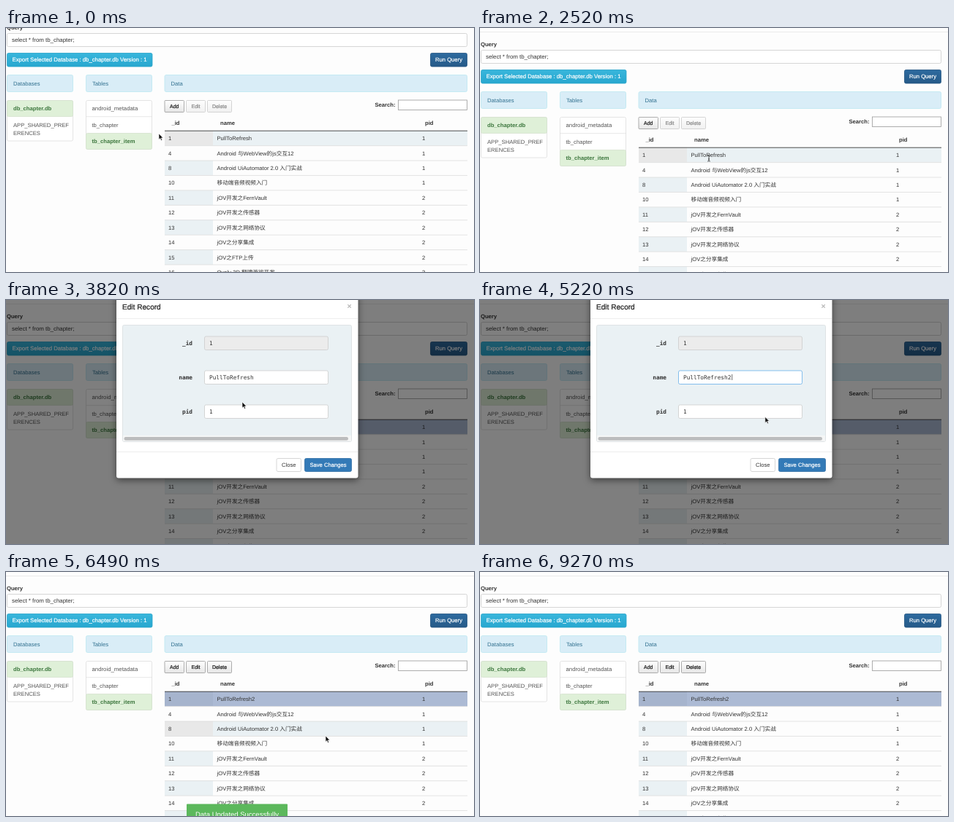
Recreate the animation shown at these times as an HTML page. Size 640 by 335 pixels, loop 9.51 s.

```html
<!DOCTYPE html>
<html lang="zh">
<head>
<meta charset="utf-8">
<title>Database editor</title>
<style>
html, body { margin: 0; width: 100%; height: 100%; overflow: hidden; background: #fdfdfd; }
svg { display: block; width: 640px; height: 335px; }
text { font: 7.65px "Liberation Sans", "Noto Sans CJK SC", sans-serif; fill: #333; white-space: pre; text-rendering: geometricPrecision; }
.b { font-weight: bold; }
.m { stroke: currentColor; stroke-width: .22px; }
.w { fill: #fff; color: #fff; }
.head { fill: #31708f; color: #31708f; }
.ok { fill: #3c763d; }
.item { fill: #555; }
.small { font-size: 7px; }
.mono { font-family: "DejaVu Sans Mono", monospace; font-size: 7.75px; }
.mid { text-anchor: middle; }
.end { text-anchor: end; }
#box { filter: drop-shadow(0 3px 5px rgba(0, 0, 0, .5)); }
</style>
</head>
<body>
<svg id="stage" viewBox="0 0 640 335">
  <defs>
    <linearGradient id="info" x2="0" y2="1"><stop stop-color="#38b6dc"/><stop offset="1" stop-color="#28a7cf"/></linearGradient>
    <linearGradient id="run" x2="0" y2="1"><stop stop-color="#2d6a9f"/><stop offset="1" stop-color="#265a88"/></linearGradient>
    <linearGradient id="grey" x2="0" y2="1"><stop stop-color="#fff"/><stop offset="1" stop-color="#e6e6e6"/></linearGradient>
  </defs>
</svg>
<script>
const LOOP = 9510, ROW_TOP = 164.2, ROW_H = 20.42;
const rows = [
  [1, 'PullToRefresh', 1], [4, 'Android 与WebView的js交互12', 1],
  [8, 'Android UiAutomator 2.0 入门实战', 1], [10, '移动端音频视频入门', 1],
  [11, 'jOV开发之FernVault', 2], [12, 'jOV开发之传感器', 2], [13, 'jOV开发之网络协议', 2],
  [14, 'jOV之分享集成', 2], [15, 'jOV之FTP上传', 2], [16, 'Ovaly 3D 翻牌游戏开发', 3]
];

// y is the vertical middle of the text
const text = (x, y, s, cls = '', attrs = '') =>
  `<text x="${x}" y="${y + 2.75}" class="${cls}" ${attrs}>${s}</text>`;
const rect = (x, y, x2, y2, fill, stroke = 'none', r = 0, attrs = '') => {
  const o = stroke === 'none' ? 0 : .5;
  return `<rect x="${x + o}" y="${y + o}" width="${x2 - x - 2 * o}" height="${y2 - y - 2 * o}" rx="${r}" fill="${fill}" stroke="${stroke}" stroke-width=".8" ${attrs}/>`;
};
const line = (x, y, x2, color, w = .7) =>
  `<path d="M${x} ${y}H${x2}" stroke="${color}" stroke-width="${w}"/>`;
const heading = (x, x2, s) => rect(x, 87, x2, 111, '#d9edf7', '#bce8f1', 2) + text(x + 9, 99, s, 'head');
const tool = (x, x2, s, id) => `<g id="${id}">` + rect(x, 122, x2, 139, 'url(#grey)', '#999', 1) +
  text((x + x2) / 2, 130.7, s, 'small mid m') + '</g>';
const field = (y, label, value, fill, id) => text(255, y, label, 'mono b end') +
  rect(271, y - 9.5, 441, y + 10, fill, '#ccc', 2, `id="${id}Box"`) + text(278, y, value, 'mono', `id="${id}"`);

const tableRow = ([id, name, pid], i) => {
  const y = ROW_TOP + i * ROW_H, mid = y + ROW_H / 2;
  return rect(217, y, 631, y + ROW_H, '#fdfdfd', 'none', 0, `id="row${i}"`) +
    rect(217, y, 283, y + ROW_H, '#fdfdfd', 'none', 0, `id="cell${i}"`) +
    (i ? line(217, y, 631, '#d8d8d8') : '') +
    text(222, mid, id) + text(288.5, mid, name, '', `id="name${i}"`) + text(569, mid, pid);
};

const page = `<g id="page">
  ${line(0, 5.5, 640, '#e4e4e4')}
  ${text(1, 22, 'Query', 'b')}
  ${rect(1, 30, 631, 49, '#fff', '#ccc', 2)}
  ${text(8, 39.3, 'select * from tb_chapter;', '', 'style="font-size:7.9px"')}
  ${rect(1, 57, 200.5, 76.5, 'url(#info)', '#28a4c9', 2)}
  ${text(8.5, 66.5, 'Export Selected Database : db_chapter.db Version : 1', 'w m', 'style="font-size:7.74px"')}
  ${rect(580, 57, 631, 76.5, 'url(#run)', '#245580', 2)}
  ${text(605.5, 66.5, 'Run Query', 'w m mid')}
  ${heading(1, 92, 'Databases')}${heading(109, 200, 'Tables')}${heading(216.5, 631, 'Data')}
  ${rect(1, 122, 92, 178.5, '#fff', '#ddd', 2)}
  ${rect(1, 122, 92, 145, '#dff0d8', '#d5e3cf', 2)}
  ${text(10, 133.3, 'db_chapter.db', 'b ok')}
  ${text(10, 156, 'APP_SHARED_PREF', 'item')}${text(10, 167, 'ERENCES', 'item')}
  ${rect(109, 122, 200, 190, '#fff', '#ddd', 2)}${line(109, 144.7, 200, '#ddd')}
  ${rect(109, 167, 200, 190, '#dff0d8', '#d5e3cf', 2)}
  ${text(117.5, 133.3, 'android_metadata', 'item', 'style="font-size:7.8px"')}
  ${text(117.5, 156, 'tb_chapter', 'item')}${text(117.5, 178.5, 'tb_chapter_item', 'b ok')}
  ${tool(216.5, 244, 'Add', 'add')}${tool(246, 273, 'Edit', 'edit')}${tool(275, 309, 'Delete', 'del')}
  ${text(504.5, 128.7, 'Search:', 'b')}${rect(536, 121.5, 631, 136, '#fff', '#999')}
  ${text(226.5, 153.2, '_id', 'b')}${text(293, 153.2, 'name', 'b')}${text(573, 153.2, 'pid', 'b')}
  ${rows.map(tableRow).join('')}
  ${line(217, ROW_TOP, 631, '#222', .8)}
</g>`;

const modal = `<rect id="shade" width="640" height="335"/>
<g id="modal">
  <rect id="box" x="151" y="-20" width="330.5" height="264.5" rx="3" fill="#fff"/>
  ${text(159, 10.3, 'Edit Record', 'm', 'style="font-size:10.1px"')}
  ${text(469.5, 9, '×', 'mid b', 'style="font-size:10.5px;fill:#b5b5b5"')}
  ${line(151, 25.5, 481, '#e8e8e8')}
  ${rect(159, 34, 473, 195, '#eaf1f4', '#d9dde0', 2)}
  ${rect(160, 186, 472, 194, '#f5f6f6')}${rect(161.5, 188, 468, 192.7, '#bcbdbe', 'none', 2.3)}
  ${field(59, '_id', '1', '#ececec', 'idField')}
  ${field(106, 'name', 'PullToRefresh', '#fff', 'nameField')}
  ${field(153, 'pid', '1', '#fff', 'pidField')}
  <path id="caret" d="M340 102v8" stroke="#333" stroke-width=".7"/>
  <g id="alert">${rect(159, 200.5, 473, 229, '#dff0d8', '#d0e4c6', 2)}
    ${text(168, 214.5, 'Success!', 'b ok')}${text(204, 214.5, 'This record has been updated.', 'ok')}</g>
  <g id="foot">${line(151, 208.5, 481, '#e5e5e5')}
    <g id="close">${rect(369.5, 217, 404, 236, '#fff', '#ccc', 2)}${text(386.7, 226.5, 'Close', 'mid')}</g>
    <g id="save">${rect(408, 217, 473, 236, '#337ab7', '#2e6da4', 2, 'id="saveBox"')}${text(440.5, 226.5, 'Save Changes', 'w m mid')}</g>
    <g id="saving">${rect(430, 216, 474, 237, 'none', '#7fb4dd', 3)}${rect(431, 217, 473, 236, '#286090', '#204d74', 2)}${text(452, 226.5, 'Saving..', 'w m mid')}</g>
  </g>
</g>
<g id="toast">${rect(247, 318.5, 385, 348, '#5cb85c', 'none', 1)}
  ${text(316, 333.7, 'Data Updated Successfully', 'w mid', 'style="font-size:9.5px"')}</g>
<path id="arrow" d="M0 0V8.2L1.9 6.4 3.2 9.4 4.6 8.8 3.3 5.9H5.8Z" fill="#111" stroke="#fff" stroke-width=".6"/>
<path id="beam" d="M-1.8-4Q0-4 0-3 0-4 1.8-4M0-3V3M-1.8 4Q0 4 0 3 0 4 1.8 4M-1 1H1" fill="none" stroke="#222" stroke-width=".8"/>`;

const stage = document.getElementById('stage');
stage.insertAdjacentHTML('beforeend', page + modal);
const el = {};
stage.querySelectorAll('[id]').forEach(n => el[n.id] = n);

// [time, x, y]
const path = [
  [150, 209, 145], [660, 198, 122], [949, 198, 122], [950, 156, 144], [1159, 156, 144],
  [1160, 114, 165], [1449, 114, 165], [1450, 198, 178], [1750, 198, 178], [2400, 313, 179],
  [2810, 313, 179], [3000, 262, 133], [3150, 262, 133], [3550, 323, 140], [4030, 323, 140],
  [4400, 350, 106], [4920, 350, 106], [5600, 440, 229], [5960, 437, 225], [6810, 437, 225],
  [7400, 398, 196], [8070, 398, 196], [8250, 396, 176], [8450, 396, 176], [8800, 400, 214],
  [8980, 400, 214], [9260, 400, 346]
];
const ramp = (t, a, b) => Math.min(1, Math.max(0, (t - a) / (b - a)));
const ease = p => 1 - (1 - p) ** 2;
const within = (t, a, b) => t >= a && t < b;
const set = (node, attr, v) => node.setAttribute(attr, v);
const show = (node, on) => set(node, 'visibility', on ? 'visible' : 'hidden');
const move = (node, x, y) => set(node, 'transform', `translate(${x} ${y})`);

function pointer(t) {
  const i = path.findIndex(k => k[0] > t);
  if (i < 0) return path[path.length - 1].slice(1);
  if (!i) return path[0].slice(1);
  const [a, x, y] = path[i - 1], [b, x2, y2] = path[i], p = ramp(t, a, b);
  return [x + (x2 - x) * p, y + (y2 - y) * p];
}

function paintRows(selected, hover) {
  rows.forEach((_, i) => {
    const odd = i % 2 === 0;
    let fill = '#fdfdfd', cell = odd ? '#eaf1f4' : '#fdfdfd';
    if (i === hover) [fill, cell] = ['#eaf1f4', '#e8e8e8'];
    if (i === selected) [fill, cell] = i === hover ? ['#aab7d1', '#a2aec7'] : ['#acbad4', '#a6b4cd'];
    set(el['row' + i], 'fill', fill);
    set(el['cell' + i], 'fill', cell);
  });
}

function draw(t) {
  const [x, y] = pointer(t);
  const open = t < 5000 ? ease(ramp(t, 3150, 3500)) : 1 - ramp(t, 6280, 6490);
  const saving = t >= 5960, saved = t >= 6130, typed = t >= 4920;
  const focus = within(t, 4400, 5960), beam = within(t, 2200, 2850) || within(t, 4330, 5000);

  move(el.page, 0, -23 * (1 - ease(ramp(t, 150, 660))));
  let hover = -1;
  if (t < 150) hover = 0;
  else if (!open && x > 217 && y > ROW_TOP && y < 335) hover = Math.floor((y - ROW_TOP) / ROW_H);
  paintRows(t < 2670 ? -1 : within(t, 7920, 8350) ? 1 : 0, hover);
  el.name0.textContent = saved ? 'PullToRefresh2' : 'PullToRefresh';
  for (const b of [el.edit, el.del]) set(b, 'opacity', t < 2670 ? .5 : 1);

  set(el.shade, 'opacity', open / 2);
  set(el.modal, 'opacity', open);
  move(el.modal, 0, -80 * (1 - open));
  set(el.box, 'height', saved ? 304.5 : 264.5);
  move(el.foot, 0, saved ? 40 : 0);
  move(el.close, saving ? 22.5 : 0, 0);
  show(el.alert, saved);
  show(el.saving, saving);
  show(el.save, !saving);
  set(el.saveBox, 'fill', y > 217 && x > 408 ? '#286090' : '#337ab7');
  set(el.nameFieldBox, 'stroke', focus ? '#66afe9' : '#ccc');
  el.nameField.textContent = typed ? 'PullToRefresh2' : 'PullToRefresh';
  show(el.caret, focus && t % 1000 < 500);
  move(el.caret, typed ? 4.7 : 0, 0);

  show(el.toast, within(t, 6490, 8800));
  move(el.toast, 0, 17 * ramp(t, 8400, 8800));
  show(el.arrow, !beam);
  show(el.beam, beam);
  move(el.arrow, x, y);
  move(el.beam, x, y);
}

const start = performance.now();
(function tick() {
  draw((performance.now() - start) % LOOP);
  requestAnimationFrame(tick);
})();
</script>
</body>
</html>
```
